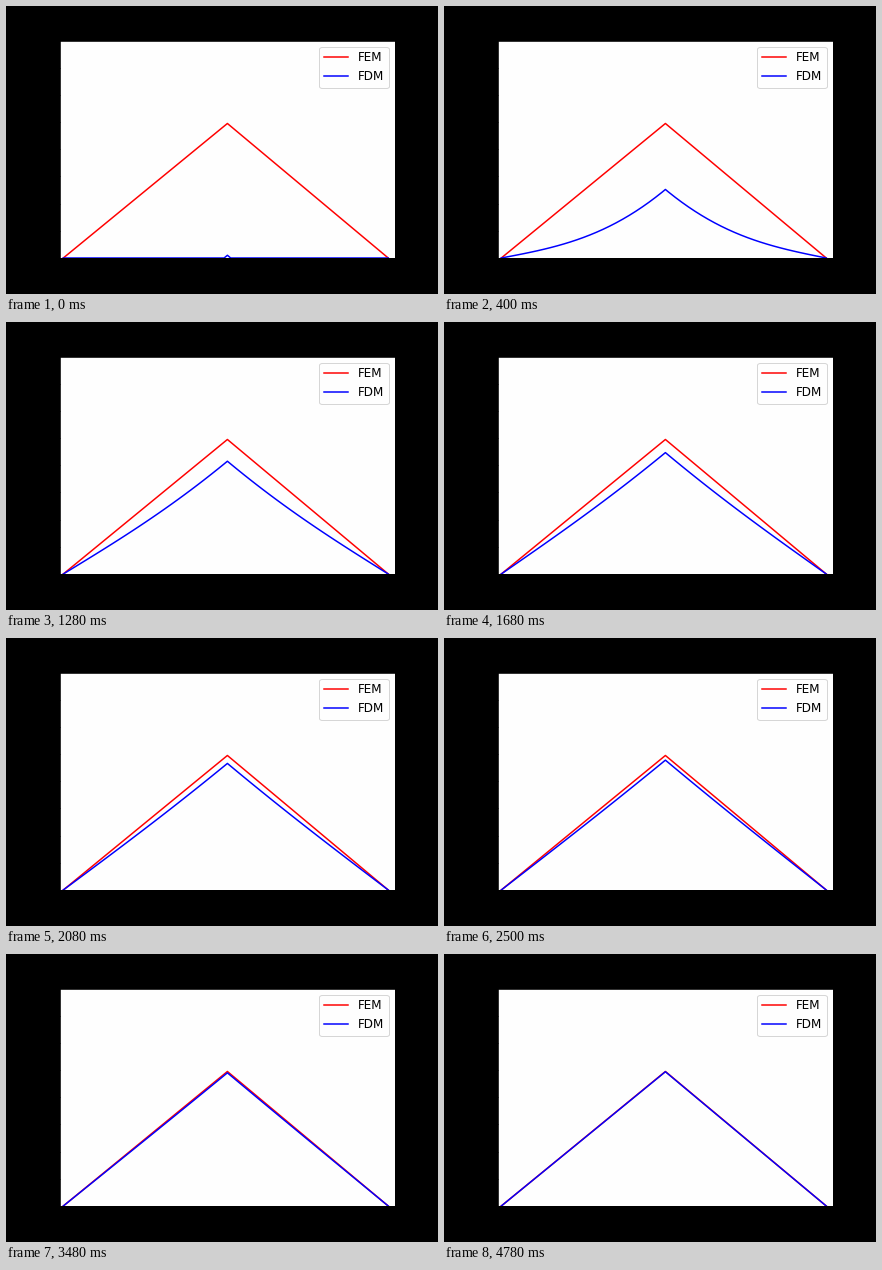
Recreate the animation shown at these times as a matplotlib script. Size 432 px wide and 288 px high, loop 4800 ms.

```python
import numpy as np
import matplotlib.pyplot as plt
from matplotlib.animation import FuncAnimation

DPI = 72
FRAMES = 240
INTERVAL = 20
STEPS_PER_FRAME = 50

H = 0.01
DT = 5e-5
NODES = 100
MID = NODES // 2
x = H * np.arange(NODES)


def steady_state():
    """Equilibrium under a unit point load at the middle node."""
    peak = x[MID] * (x[-1] - x[MID]) / x[-1]
    return np.interp(x, [x[0], x[MID], x[-1]], [0, peak, 0])


def heat_history():
    """Explicit finite differences, one stored row per frame."""
    u = np.zeros(NODES)
    rows = []
    for step in range((FRAMES - 1) * STEPS_PER_FRAME + 1):
        u[1:-1] += DT / H**2 * (u[2:] - 2 * u[1:-1] + u[:-2])
        u[MID] += DT / H
        if step % STEPS_PER_FRAME == 0:
            rows.append(u.copy())
    return rows


history = heat_history()

plt.rcParams["font.family"] = "DejaVu Sans"
fig, ax = plt.subplots(figsize=(432 / DPI, 288 / DPI), dpi=DPI,
                       facecolor="black")
fig.subplots_adjust(left=0.125, right=0.9, bottom=0.125, top=0.88)
ax.set(xlim=(-0.01, 1.01), ylim=(0, 0.4), facecolor="#fefefe")
ax.set_yticks(np.arange(0, 0.41, 0.05))

ax.plot(x, steady_state(), color="red", lw=1.5, label="FEM")
fdm_line, = ax.plot(x, history[0], color="blue", lw=1.5, label="FDM")
ax.legend(loc="upper right", fontsize=12)


def update(frame):
    fdm_line.set_ydata(history[frame])
    return fdm_line,


anim = FuncAnimation(fig, update, frames=FRAMES, interval=INTERVAL,
                     repeat=True, repeat_delay=0)
plt.show()
```
